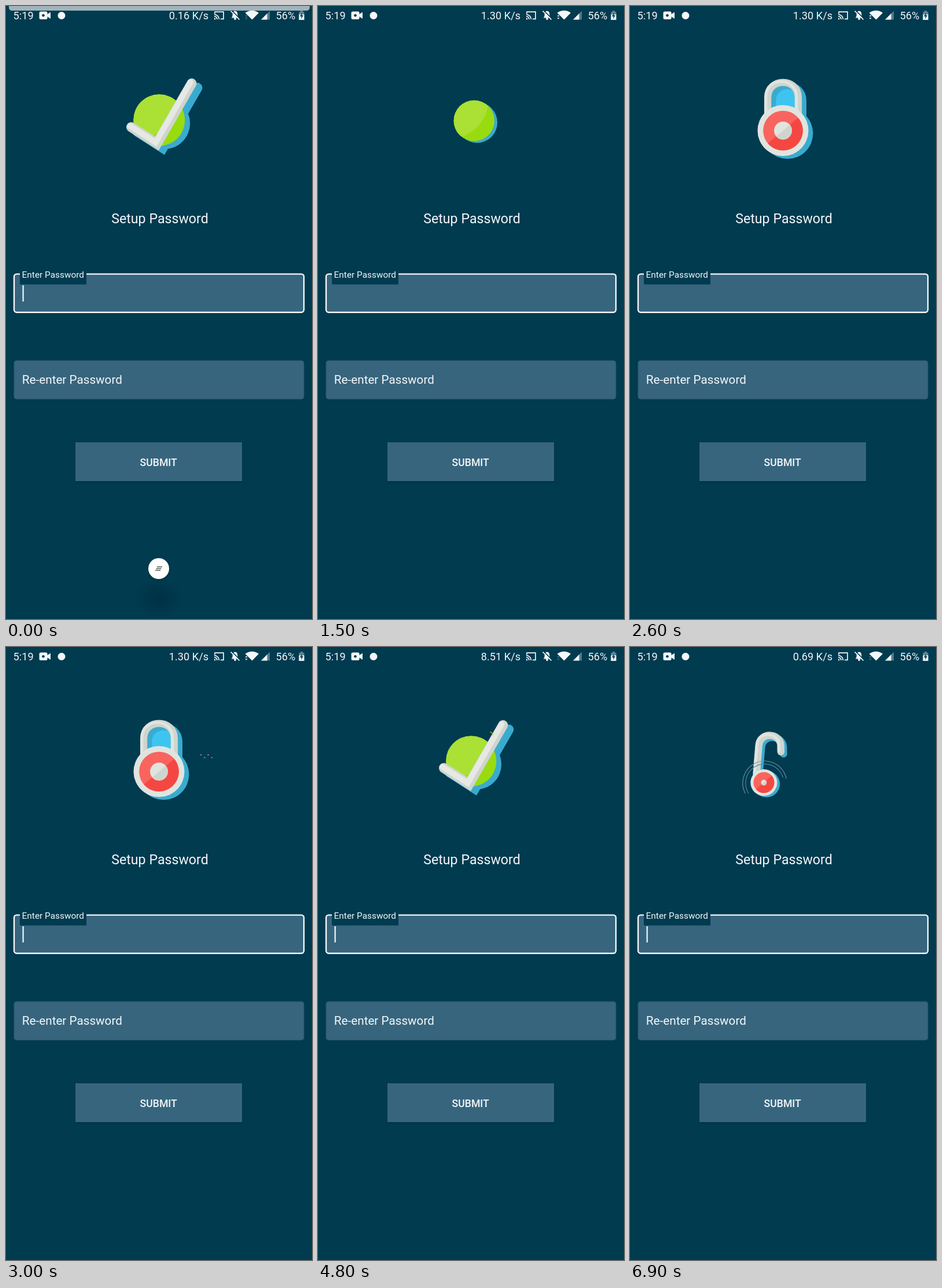
Animation of 529x1058 px, one loop 7 s. Source, as an HTML page with a canvas:

```html
<!DOCTYPE html>
<html lang="en">
<head>
<meta charset="utf-8">
<title>Setup Password</title>
<style>
html, body { margin: 0; width: 100%; height: 100%; overflow: hidden; background: #003b50; }
svg, canvas { position: absolute; left: 0; top: 0; }
text { font-family: Roboto, sans-serif; white-space: pre; }
.bar { font-size: 18.2px; }
.line { fill: none; stroke: #f4f7f8; stroke-width: 1.7; }
.field { fill: #37657e; stroke: #f4f7f8; stroke-width: 2.4; }
</style>
</head>
<body>
<svg width="529" height="1058" viewBox="0 0 529 1058" fill="#f4f7f8">
  <defs>
    <radialGradient id="dim"><stop offset="0" stop-color="#00283a" stop-opacity=".55"/><stop offset="1" stop-color="#00283a" stop-opacity="0"/></radialGradient>
    <filter id="soft" x="-30%" y="-30%" width="160%" height="160%"><feGaussianBlur stdDeviation="1.500"/></filter>
  </defs>
  <rect id="card" x="5" y="-12" width="520" height="20" rx="5" fill="#a2b3bb"/>

  <!-- status bar -->
  <text class="bar" x="12.600" y="23">5:19</text>
  <rect x="57.500" y="9.500" width="14" height="13.500" rx="2.500"/>
  <path d="M71 14.500L77 10.500V22L71 18Z"/>
  <circle cx="64.500" cy="16.300" r="2.300" fill="#003b50"/>
  <circle cx="96" cy="16.500" r="6.500"/>
  <text class="bar" id="speed" x="281.800" y="23"></text>
  <path class="line" d="M361 13.500V10.200H376V22.400H371M360 17.800A5 5 0 0 1 365 23M360 14.600A8.500 8.500 0 0 1 368.500 23"/>
  <path d="M360 20.600A2.500 2.500 0 0 1 362.500 23.200H360Z"/>
  <path d="M389.500 20.500Q391.700 19 391.700 14.500 391.700 9 396 8.500 400.300 9 400.300 14.500 400.300 19 402.500 20.500Z"/>
  <circle cx="396" cy="22" r="2"/>
  <path class="line" d="M390 7.500L405 22.500" style="stroke:#003b50"/>
  <path class="line" d="M388.500 8.500L403.500 23.500"/>
  <path d="M413.500 11.700Q425.500 3.700 437 11.700L425.500 23.500Z"/>
  <path id="traffic" d="M413.300 18L415.500 15.200 417.700 18ZM413.300 20.300H417.700L415.500 23Z"/>
  <path d="M456 8.500V23.500H441Z" opacity=".35"/>
  <path d="M451.500 13V23.500H441Z"/>
  <text class="bar" x="466.500" y="23">56%</text>
  <path d="M506.500 10H509V8H513V10H515.500V24H506.500Z" opacity=".4"/>
  <path d="M506.500 14.500H515.500V24H506.500Z"/>
  <path d="M512 11.500L508 18H510.700L510 22.500 514 16H511.500Z" fill="#003b50"/>

  <!-- form -->
  <text x="182.200" y="375" font-size="23.200">Setup Password</text>
  <rect class="field" x="14" y="462.600" width="501" height="66.200" rx="4.500"/>
  <rect x="24" y="460" width="115" height="20.500" fill="#003b50"/>
  <text x="27.600" y="469" font-size="15.400">Enter Password</text>
  <rect id="caret" x="28.500" y="482" width="2.200" height="28"/>
  <rect class="field" x="14" y="612" width="501" height="66.300" rx="4.500" style="stroke:#2a566e;stroke-width:1.200"/>
  <text x="27.800" y="652" font-size="20.700">Re-enter Password</text>
  <rect x="120" y="754.500" width="288" height="67" fill="#00222f" opacity=".4" filter="url(#soft)"/>
  <rect x="120" y="753" width="288" height="67" fill="#37657e"/>
  <text x="231.500" y="793.700" font-size="17.700" font-weight="500">SUBMIT</text>

  <g id="clear">
    <ellipse cx="264" cy="1022" rx="42" ry="36" fill="url(#dim)"/>
    <circle cx="264" cy="973" r="18" fill="#00222f" opacity=".5" filter="url(#soft)"/>
    <circle cx="264" cy="971" r="18" fill="#fff"/>
    <path d="M261 968H270M259.500 971H268.500M258 974H267" stroke="#555" stroke-width="1.300"/>
  </g>
</svg>
<canvas id="icon" width="529" height="400"></canvas>
<script>
const LOOP = 7000, CYCLE = 4900, STEP = 100;
const BLUE = '#39abcf', SKY = '#3ec4f0', LIGHT = '#e0e4df', GREY = '#cfd4ce';
const RED = '#f54742', LIME = '#98dc10';
const $ = id => document.getElementById(id);
const g = $('icon').getContext('2d');

const span = (t, a, b) => Math.min(1, Math.max(0, (t - a) / (b - a)));
const ramp = (t, a, b) => {
  const k = span(t, a, b);
  return k * k * (3 - 2 * k);
};

function disc(x, y, r, color) {
  g.fillStyle = color;
  g.beginPath();
  g.arc(x, y, r, 0, 7);
  g.fill();
}

function stroke(path, color, width, dx = 0, dy = 0) {
  g.save();
  g.translate(dx, dy);
  g.strokeStyle = color;
  g.lineWidth = width;
  g.stroke(path);
  g.restore();
}

function arc(x, y, r, from, to, color) {
  const p = new Path2D();
  p.arc(x, y, r, from * Math.PI / 180, to * Math.PI / 180);
  stroke(p, color, 1.1);
}

// disc whose lower right half is darker
function halves(x, y, r, angle, light, dark) {
  const a = angle * Math.PI / 180;
  disc(x, y, r, light);
  g.fillStyle = dark;
  g.beginPath();
  g.arc(x, y, r, a, a + Math.PI);
  g.fill();
}

function badge(t) {
  const early = t < CYCLE / 2;
  const drop = early ? span(t, 1230, 1820) : 0;
  const r = early ? 44.5 * (1 - drop ** 2) : 26 + 17.6 * ramp(t, 4150, 4450) + .9 * span(t, 4800, CYCLE);
  const drawn = early ? 1 - ramp(t, 1150, 1450) : ramp(t, 4350, 4650);
  const x = 264.8 + 11 * drop, y = 197 + 2 * drop;
  const depth = r * (1 - .6 * drop);

  const tick = new Path2D();
  const size = new DOMMatrix().translate(264, 197).scale(r / 44.5).translate(-264, -197);
  tick.addPath(new Path2D('M216.5 209L261 237.5 321 133.500'), size);
  g.lineCap = 'round';
  g.setLineDash([174 * drawn, 400]);
  if (drawn) stroke(tick, BLUE, 17, 10, 7.5);
  disc(x + depth * .2, y + depth * .125, r, BLUE);
  g.save();
  disc(x, y, r, LIME);
  g.clip();
  disc(x - 1.2 * r, y - 1.03 * r, 1.9 * r, '#abe035');
  g.restore();
  if (drawn) {
    stroke(tick, GREY, 17);
    stroke(tick, '#e6e8e4', 10, -2.2, -2);
  }
  g.setLineDash([]);
  if (t > 4700 && t < 4850) stroke(new Path2D('M298 146.500L302 149.500V152'), LIME, 1.2);
}

// U shape standing on the disc's centre, turned by tilt degrees
function shackle(x, y, tilt, left, gap, height, base, tail, splay) {
  const right = left + gap, top = -height - gap * .66;
  const u = new Path2D(), p = new Path2D();
  u.moveTo(left, -base);
  u.lineTo(left, -height);
  u.bezierCurveTo(left, top, right, top, right, -height);
  u.lineTo(right + splay, tail - height);
  p.addPath(u, new DOMMatrix().translate(x, y).rotate(tilt));
  return p;
}

function lock(t) {
  const leap = ramp(t, 1810, 2200), settle = ramp(t, 2200, 2420);
  const open = ramp(t, 3450, 3900), leave = ramp(t, 3900, 4150);
  const bounce = leap ** 4 * (1 - settle), loose = 1 - settle;
  const x = 204 + 57 * leap + 3.5 * settle;
  const y = 253.4 - 40.4 * leap + 2 * settle - 7 * open - 11 * leave;
  const r = 48 * leap - 4 * settle - 13 * open - 5 * leave;
  const dx = r * .18 + 8.4 * bounce, dy = r * .11;

  const size = Math.min(1, 2.1 * leap) * (1 - leave);
  const gap = size * Math.max(38, 1.2 * r), w = size * (12.3 + 3.7 * bounce);
  const left = 5 * loose - 3 * open - gap / 2;
  const height = size * (57 + 4 * loose + 42 * bounce + 4 * open);
  const tail = size * Math.max(0, 39 - 60 * (1 - leap) - 9 * settle - 9 * open);
  const tilt = 6 * loose - 23 * bounce + 38 * open;
  const u = shackle(x, y, tilt, left, gap, height, .6 * r, tail, 17 * bounce);

  g.lineCap = 'round';
  if (size > 0) {
    g.globalAlpha = settle * (1 - span(t, 3450, 3550));
    g.fillStyle = SKY;
    g.fill(u);
    g.globalAlpha = 1;
    stroke(u, BLUE, w, dx, dy + 1);
  }
  disc(x + dx, y + dy, r, BLUE);
  if (size > 0) {
    stroke(u, GREY, w);
    stroke(u, LIGHT, w * .4, -w * .25, -w * .12);
  }
  disc(x, y, r, LIGHT);
  const split = -40 - 25 * bounce + 31 * open;
  halves(x, y, r * (.78 + .16 * open), split, '#f9645f', RED);
  halves(x, y, r * (.08 + .27 * leap - .16 * open), split, LIGHT, GREY);
  trails(t, x, y, r);
}

function trails(t, x, y, r) {
  g.lineCap = 'butt';
  for (let i = 0; i < 2; i++) {
    if (t > 1880 && t < 2090) arc(x + 1.5, y + 1, r + 15 - 5 * i, 152 - 5 * i, 348 - 5 * i, i ? '#3f8fa9' : '#7f908f');
    if (t > 2110 && t < 2320) arc(x + 14 - 9 * i, y + 7 - 7 * i, r + 9 - 9 * i, -40, 27, i ? '#b9605c' : BLUE);
  }
  if (t < 2800 || t > 3200) return;
  for (let i = 0; i < 4; i++) {
    g.fillStyle = i % 2 ? '#4b9cb4' : '#b0807c';
    g.fillRect(335.5 + 6.3 * i + (t - 3000) * .06, 185.5 + i % 2 * 4.5, 3, 1.6);
  }
}

function drawIcon(t) {
  g.clearRect(0, 0, 529, 400);
  g.save();
  g.beginPath();
  g.rect(0, 93, 529, 307);
  g.clip();
  if (t > 1810 && t < 4150) lock(t);
  else badge(t);
  g.restore();
}

function draw(t) {
  drawIcon(t % CYCLE);
  const speed = ['0.16', '1.30', '8.51', '0.69'][Math.floor((t + 2650) / 3000)];
  $('speed').textContent = speed + ' K/s';
  $('caret').style.opacity = (t + 350) % 1000 < 500 ? 1 : 0;
  $('traffic').style.opacity = t > 350 && t < 4400 ? .9 : .3;
  $('card').setAttribute('transform', `translate(0 ${-9 * ramp(t, 0, 300)})`);
  $('clear').style.opacity = 1 - span(t, 0, 400);
}

const start = performance.now();
function tick() {
  const t = (performance.now() - start) % LOOP;
  draw(Math.floor(t / STEP) * STEP);
  requestAnimationFrame(tick);
}
tick();
</script>
</body>
</html>
```
